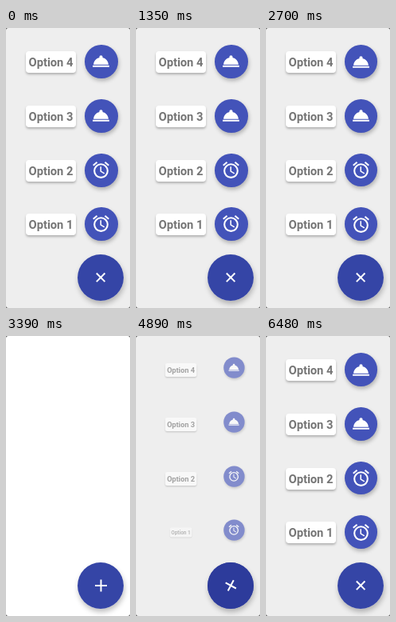
These frames come from a looping animation (156x350 px, 6510 ms). An HTML page:

```html
<!DOCTYPE html>
<html lang="en">
<head>
<meta charset="utf-8">
<title>Speed dial</title>
<style>
  /* 0 = menu closed, 1 = menu open */
  @property --open { syntax: "<number>"; inherits: true; initial-value: 1; }

  html, body { margin: 0; width: 100%; height: 100%; overflow: hidden; background: #555; }

  .stage {
    position: relative; width: 156px; height: 350px; overflow: hidden;
    border-radius: 3px; background: #eee;
    animation: toggle 6510ms infinite, backdrop 6510ms linear infinite;
  }

  .label, .mini {
    position: absolute; opacity: var(--open); transform: scale(var(--open));
  }
  .label {
    left: 25px; top: calc(var(--y) * 1px - 13px); width: 63px; height: 27px;
    border-radius: 4px; background: #fff; color: #757575;
    box-shadow: 0 2px 3px rgba(0, 0, 0, .26);
    font: 700 14.7px/28px Roboto, "Liberation Sans", sans-serif;
    text-align: center; white-space: nowrap;
  }
  .label.late { animation: toggle 6510ms -6482ms infinite; }

  .mini {
    left: 98.5px; top: calc(var(--y) * 1px - 21px); width: 41.5px; height: 41.5px;
    border-radius: 50%; background: #4353b9; transform-origin: 73% 35%;
    box-shadow: 1px 3px 5px rgba(0, 0, 0, .25);
  }
  .mini svg { position: absolute; left: 8.25px; top: 8.25px; width: 25px; height: 25px; fill: #fff; }

  .fab {
    position: absolute; left: 90px; top: 282.5px; width: 58px; height: 58px;
    border-radius: 50%; background: #3545a6; overflow: hidden;
  }
  .shade {
    position: absolute; left: 90px; top: 282.5px; width: 58px; height: 58px;
    border-radius: 50%; box-shadow: 1px 4px 6px rgba(0, 0, 0, .25);
  }
  .press {
    position: absolute; inset: 0; background: #2c3a9b;
    opacity: calc(4 * var(--open) * (1 - var(--open)));
  }
  .plus {
    position: absolute; left: 21.5px; top: 21.5px; width: 15px; height: 15px;
    transform: rotate(calc(45deg * var(--open)));
  }
  .plus::before, .plus::after {
    content: ""; position: absolute; left: 0; top: 6.5px; width: 15px; height: 2px; background: #fff;
  }
  .plus::after { transform: rotate(90deg); }

  @keyframes toggle {
    0%     { --open: 1; animation-timing-function: ease-in; }
    3.84%, 10.75%  { --open: 0; animation-timing-function: ease-out; }
    14.9%, 20.74%  { --open: 1; animation-timing-function: ease-in; }
    24.58%, 32.03% { --open: 0; animation-timing-function: ease-out; }
    36.18%, 42.4%  { --open: 1; animation-timing-function: ease-in; }
    46.24%, 54.69% { --open: 0; animation-timing-function: ease-out; }
    58.83%, 64.29% { --open: 1; animation-timing-function: ease-in; }
    67.82%, 73.89% { --open: 0; animation-timing-function: ease-out; }
    76.65%, 82.75% { --open: 1; animation-timing-function: ease-in; }
    86.28%, 92.86% { --open: 0; animation-timing-function: ease-out; }
    96.7%, 100%    { --open: 1; }
  }

  /* The grey veil fades out on closing and cuts in on opening */
  @keyframes backdrop {
    0%, 2.3%       { background-color: #eee; }
    5.38%, 10.05%  { background-color: #fff; }
    10.06%, 23.04% { background-color: #eee; }
    26.11%, 31.3%  { background-color: #fff; }
    31.31%, 44.7%  { background-color: #eee; }
    47.77%, 53.99% { background-color: #fff; }
    54%, 66.59%    { background-color: #eee; }
    69.66%, 73.19% { background-color: #fff; }
    73.2%, 85.05%  { background-color: #eee; }
    88.13%, 92.16% { background-color: #fff; }
    92.17%, 100%   { background-color: #eee; }
  }
</style>
</head>
<body>
<svg width="0" height="0" style="position:absolute">
  <symbol id="bell" viewBox="0 0 24 24">
    <path d="M2 17h20v2H2zm11.84-9.21c.1-.24.16-.51.16-.79 0-1.1-.9-2-2-2s-2 .9-2 2c0 .28.06.55.16.79C6.25 8.6 3.27 11.93 3 16h18c-.27-4.07-3.25-7.4-7.16-8.21z"/>
  </symbol>
  <symbol id="alarm" viewBox="0 0 24 24">
    <path d="M22 5.72l-4.6-3.86-1.29 1.53 4.6 3.86zM7.88 3.39L6.6 1.86 2 5.71l1.29 1.53zM12.5 8H11v6l4.75 2.85.75-1.23-4-2.37z"/>
    <circle cx="12" cy="13" r="8" fill="none" stroke="#fff" stroke-width="2"/>
  </symbol>
</svg>
<div class="stage">
  <div style="--y:42.3"><div class="label">Option 4</div><div class="mini"><svg><use href="#bell"/></svg></div></div>
  <div style="--y:110"><div class="label">Option 3</div><div class="mini"><svg><use href="#bell"/></svg></div></div>
  <div style="--y:177.7"><div class="label">Option 2</div><div class="mini"><svg><use href="#alarm"/></svg></div></div>
  <div style="--y:245.4"><div class="label late">Option 1</div><div class="mini"><svg><use href="#alarm"/></svg></div></div>
  <div class="shade"></div>
  <div class="fab"><div class="press"></div><div class="plus"></div></div>
</div>
</body>
</html>
```
